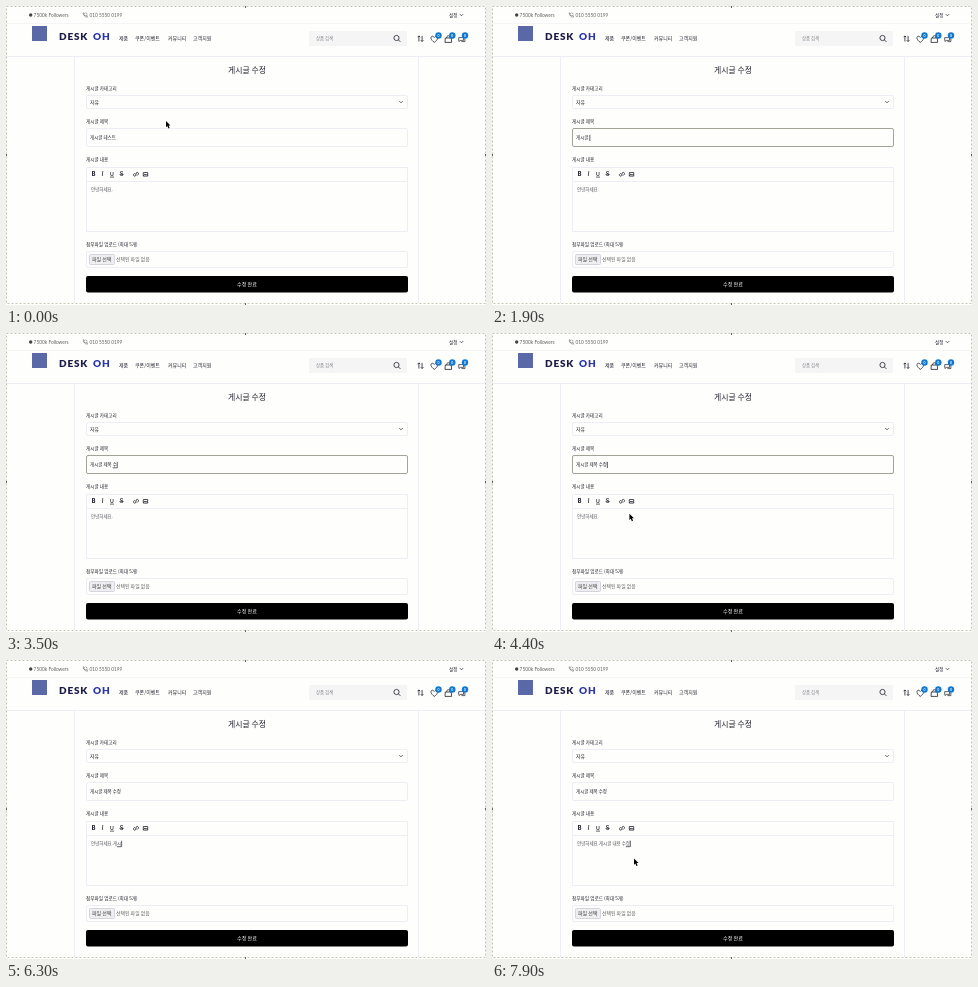
Write an HTML page with a canvas that moves like this. It is 480 by 299 pixels and loops after 8 s.

```html
<!DOCTYPE html>
<html lang="ko">
<head>
<meta charset="utf-8">
<style>
html, body { margin: 0; width: 100%; height: 100%; overflow: hidden; background: #fefefd; }
canvas { display: block; width: 480px; height: 299px; }
</style>
</head>
<body>
<canvas id="stage"></canvas>
<script>
const W = 480, H = 299, LOOP = 8000;
const canvas = document.getElementById('stage');
const dpr = window.devicePixelRatio || 1;
canvas.width = Math.round(W * dpr);
canvas.height = Math.round(H * dpr);
const ctx = canvas.getContext('2d');

const KR = '"Noto Sans CJK KR", "Noto Sans CJK", sans-serif';
const LATIN = 'Lato, sans-serif';
const UI = 'Inter, sans-serif';
const PAGE = '#fefefd', INK = '#20202c', LINE = '#ededf6', FOCUS = '#a3a398';
const FIELD = 4.5;

// [time, text, composing]
const titleSteps = [
  [0, '게시글 테스트'], [1200, '게시글 테스'], [1400, '게시글 테'], [1600, '게시글 '],
  [2200, '게시글 ㅈ', 1], [2350, '게시글 제', 1], [2500, '게시글 젬', 1],
  [2650, '게시글 제모', 1], [2800, '게시글 제목', 1], [3000, '게시글 제목 '],
  [3300, '게시글 제목 ㅅ', 1], [3500, '게시글 제목 수', 1], [3700, '게시글 제목 숮', 1],
  [3800, '게시글 제목 수저', 1], [3900, '게시글 제목 수정', 1], [4300, '게시글 제목 수정']
];
const HELLO = '안녕하세요.';
const bodySteps = [
  [0, ''], [5900, 'ㄱ', 1], [6000, '게', 1], [6150, '겟', 1], [6300, '게시', 1],
  [6400, '게식', 1], [6500, '게시그', 1], [6600, '게시글', 1], [6700, '게시글 '],
  [6800, '게시글 ㄴ', 1], [6900, '게시글 내', 1], [7000, '게시글 냉', 1],
  [7100, '게시글 내요', 1], [7200, '게시글 내용', 1], [7300, '게시글 내용 '],
  [7400, '게시글 내용 ㅅ', 1], [7500, '게시글 내용 수', 1], [7600, '게시글 내용 숮', 1],
  [7700, '게시글 내용 수저', 1], [7800, '게시글 내용 수정', 1]
];
// each run: pointer visible from first to last time, [time, x, y]
const pointerRuns = [
  [[0, 160, 115], [400, 152, 130.5], [1200, 152, 130.5]],
  [[4000, 150, 134], [4500, 136, 186], [5800, 136, 186]],
  [[7700, 137, 189], [7900, 142, 198.5], [8000, 142, 198.5]]
];

const stepAt = (steps, t) => steps.filter(s => s[0] <= t).pop();

function setFont(size, weight, family) {
  ctx.font = `${weight} ${size * 10}px ${family}`;
}

function label(str, x, y, size, { weight = 500, color = INK, family = KR, align = 'left', space = 0 } = {}) {
  ctx.save();
  ctx.translate(x, y);
  ctx.scale(0.1, 0.1);
  setFont(size, weight, family);
  ctx.letterSpacing = space * 10 + 'px';
  ctx.textAlign = align;
  ctx.fillStyle = color;
  ctx.fillText(str, 0, 0);
  ctx.restore();
}

function widthOf(str, size) {
  ctx.save();
  setFont(size, 500, KR);
  const w = ctx.measureText(str).width / 10;
  ctx.restore();
  return w;
}

function box(x, y, w, h, r, fill, stroke) {
  ctx.beginPath();
  ctx.roundRect(x, y, w, h, r);
  if (fill) { ctx.fillStyle = fill; ctx.fill(); }
  if (stroke) { ctx.strokeStyle = stroke; ctx.lineWidth = 1; ctx.stroke(); }
}

function path(points, color = INK, width = 0.8) {
  ctx.beginPath();
  points.forEach(([x, y], i) => i ? ctx.lineTo(x, y) : ctx.moveTo(x, y));
  ctx.strokeStyle = color;
  ctx.lineWidth = width;
  ctx.stroke();
}

function curve(d, x, y, width = 0.8, color = INK) {
  ctx.save();
  ctx.translate(x, y);
  ctx.strokeStyle = color;
  ctx.lineWidth = width;
  ctx.stroke(new Path2D(d));
  ctx.restore();
}

function disc(x, y, r, color) {
  ctx.beginPath();
  ctx.arc(x, y, r, 0, Math.PI * 2);
  ctx.fillStyle = color;
  ctx.fill();
}

const chevron = (x, y) => path([[x - 1.7, y - 0.9], [x, y + 0.8], [x + 1.7, y - 0.9]], INK, 0.7);

function screenFrame() {
  ctx.save();
  ctx.setLineDash([2, 2]);
  ctx.strokeStyle = '#c6c6b4';
  ctx.lineWidth = 1;
  ctx.strokeRect(0.5, 0.5, W - 1, H - 2);
  ctx.restore();
  ctx.fillStyle = '#66665a';
  for (const [x, y] of [[0, 148], [W - 1, 148], [239, 0], [239, H - 2]]) ctx.fillRect(x, y, 1, 2);
}

function header() {
  const light = { weight: 400, family: LATIN, color: '#62625a' };
  disc(24.7, 9, 1.7, '#444');
  label('7500k Followers', 27.6, 10.8, 4.8, light);
  curve('M-2-2C-1.5 .5 .3 2.2 2.4 2.2L2.4 .8 .9 .4 .2 1.1-1-.4-.5-1-.9-2.2ZM.4-2.2Q2-2 2.2-.4', 79, 9, 0.5, '#55555c');
  label('010 5550 0199', 83.6, 10.8, 4.75, light);
  label('설정', 443, 10.7, 4.6);
  chevron(455.5, 9);
  path([[0, 17.5], [W, 17.5]], '#f5f5f8', 1);
  path([[0, 50.5], [W, 50.5]], LINE, 1);

  box(26, 20, 15, 15, 0, '#5a68a8');
  const brand = { weight: 900, family: LATIN, space: 0.8 };
  label('DESK', 53, 34.3, 10, { ...brand, color: '#1b1b48' });
  label('OH', 87, 34.3, 10, { ...brand, color: '#2a35b0' });
  [['제품', 113], ['쿠폰/이벤트', 129], ['커뮤니티', 162], ['고객지원', 187]]
    .forEach(([s, x]) => label(s, x, 34, 5));

  box(303, 25, 98, 15, 1, '#f5f5f6');
  label('상품 검색', 310, 34, 4.4, { weight: 400, color: '#85858a' });
  ctx.beginPath();
  ctx.arc(390.5, 32, 2.6, 0, Math.PI * 2);
  ctx.strokeStyle = INK;
  ctx.lineWidth = 0.8;
  ctx.stroke();
  path([[392.4, 33.9], [394.4, 35.9]]);

  curve('M-1.6 2.8V-2.8M-2.9-1.5L-1.6-2.8-.3-1.5M1.6-2.8V2.8M.3 1.5L1.6 2.8 2.9 1.5', 414.5, 32.7);
  curve('M0 3.2C-6-1-2.5-5 0-1.8C2.5-5 6-1 0 3.2Z', 428.3, 33.2);
  curve('M-3-1H3L3.3 3.4H-3.3ZM-1.7-1C-1.7-4 1.7-4 1.7-1', 442.3, 33);
  curve('M-3-1.6H1.8V1.2H-1.3L-2.5 2.4V1.2H-3ZM2.6-.4H3.2V2.4H-.3', 455.7, 33.2, 0.7);
  [432.5, 446.3, 459].forEach(x => {
    disc(x, 29.5, 3.2, '#1178d2');
    label('0', x, 30.7, 3.4, { weight: 700, color: '#fff', family: LATIN, align: 'center' });
  });
}

function editorTools() {
  const glyph = { family: UI, align: 'center' };
  label('B', 87.5, 170.3, 5.6, { ...glyph, weight: 800 });
  label('I', 96.5, 170.3, 5.6, { ...glyph, weight: 'italic 600' });
  label('U', 106, 169.8, 5.2, { ...glyph, weight: 600 });
  path([[104, 171.1], [108, 171.1]], INK, 0.7);
  label('S', 115.6, 170.3, 5.6, { ...glyph, weight: 600 });
  path([[113.4, 168.4], [117.8, 168.4]], INK, 0.6);
  curve('M-.6-.4L.8-1.8A1.3 1.3 0 0 1 2.4 0L1.2 1.2M.6 .4L-.8 1.8A1.3 1.3 0 0 1-2.4 0L-1.2-1.2M-.8 .8L.8-.8', 130, 168.3);
  curve('M-2.2-1.8H2.2V1.8H-2.2ZM-2 1.3L-.6-.3.6.8 1.3 0 2.1 1', 139.5, 168.3);
}

function form(titleFocus) {
  path([[68.5, 51], [68.5, H - 2]], LINE, 1);
  path([[412.5, 51], [412.5, H - 2]], LINE, 1);
  label('게시글 수정', 241, 67.4, 7.9, { weight: 500, align: 'center' });
  label('게시글 카테고리', 80, 83.5, 4.6);
  label('게시글 제목', 80, 116.8, 4.6);
  label('게시글 내용', 80, 155, 4.6);
  label('첨부파일 업로드 (최대 5개)', 80, 239.5, 4.65);

  box(80.5, 89.5, 321, 13, 1.5, null, LINE);
  label('자유', 84, 97.9, 4.9);
  chevron(395, 96);
  box(80.5, 122.5, 321, 18, 1.5, null, titleFocus ? FOCUS : LINE);
  box(80.5, 161.5, 321, 14, 0, null, LINE);
  box(80.5, 175.5, 321, 50, 0, null, LINE);
  editorTools();
  box(80.5, 245.5, 321, 16, 1.5, null, LINE);
  box(83.5, 248.5, 25, 10, 1, '#efeff2', '#d4d4de');
  label('파일 선택', 86, 255.3, 5, { weight: 400, color: '#3c3c3c' });
  label('선택된 파일 없음', 110, 255.3, 4.9, { weight: 400, color: '#606060' });
  box(80, 270, 322, 16.5, 2, '#000');
  label('수정 완료', 241, 280, 5.1, { color: '#fff', align: 'center' });
}

function entry(str, x, y, composing, focused, color) {
  label(str, x, y, FIELD, { color });
  const end = x + widthOf(str, FIELD);
  if (composing) {
    const from = x + widthOf(str.slice(0, -1), FIELD);
    path([[from, y + 1.4], [end, y + 1.4]], INK, 0.7);
  }
  if (focused) path([[end + 0.4, y - 4.6], [end + 0.4, y + 1.6]], INK, 0.7);
}

function pointer(t) {
  const run = pointerRuns.find(r => t >= r[0][0] && t < r[r.length - 1][0]);
  if (!run) return;
  const i = run.findIndex(p => p[0] > t);
  const [t0, x0, y0] = run[i - 1], [t1, x1, y1] = run[i];
  const u = (t - t0) / (t1 - t0), k = u * u * (3 - 2 * u);
  ctx.save();
  ctx.translate(x0 + (x1 - x0) * k, y0 + (y1 - y0) * k);
  const arrow = new Path2D('M0 0V6.3L1.4 5 2.4 7.5 3.6 7 2.6 4.6H4.5Z');
  ctx.strokeStyle = '#fff';
  ctx.lineWidth = 1;
  ctx.stroke(arrow);
  ctx.fillStyle = '#000';
  ctx.fill(arrow);
  ctx.restore();
}

function draw(t) {
  ctx.setTransform(canvas.width / W, 0, 0, canvas.height / H, 0, 0);
  ctx.fillStyle = PAGE;
  ctx.fillRect(0, 0, W, H);
  const titleFocus = t >= 400 && t < 4500;
  const bodyFocus = t >= 4500;
  header();
  form(titleFocus);
  const [, title, titleComposing] = stepAt(titleSteps, t);
  const [, extra, bodyComposing] = stepAt(bodySteps, t);
  entry(title, 84, 133.4, titleComposing, titleFocus, INK);
  entry(HELLO + extra, 85, 185.3, bodyComposing, bodyFocus, '#55555c');
  screenFrame();
  pointer(t);
}

function tick(now) {
  draw(now % LOOP);
  requestAnimationFrame(tick);
}
draw(0);
requestAnimationFrame(tick);
</script>
</body>
</html>
```
